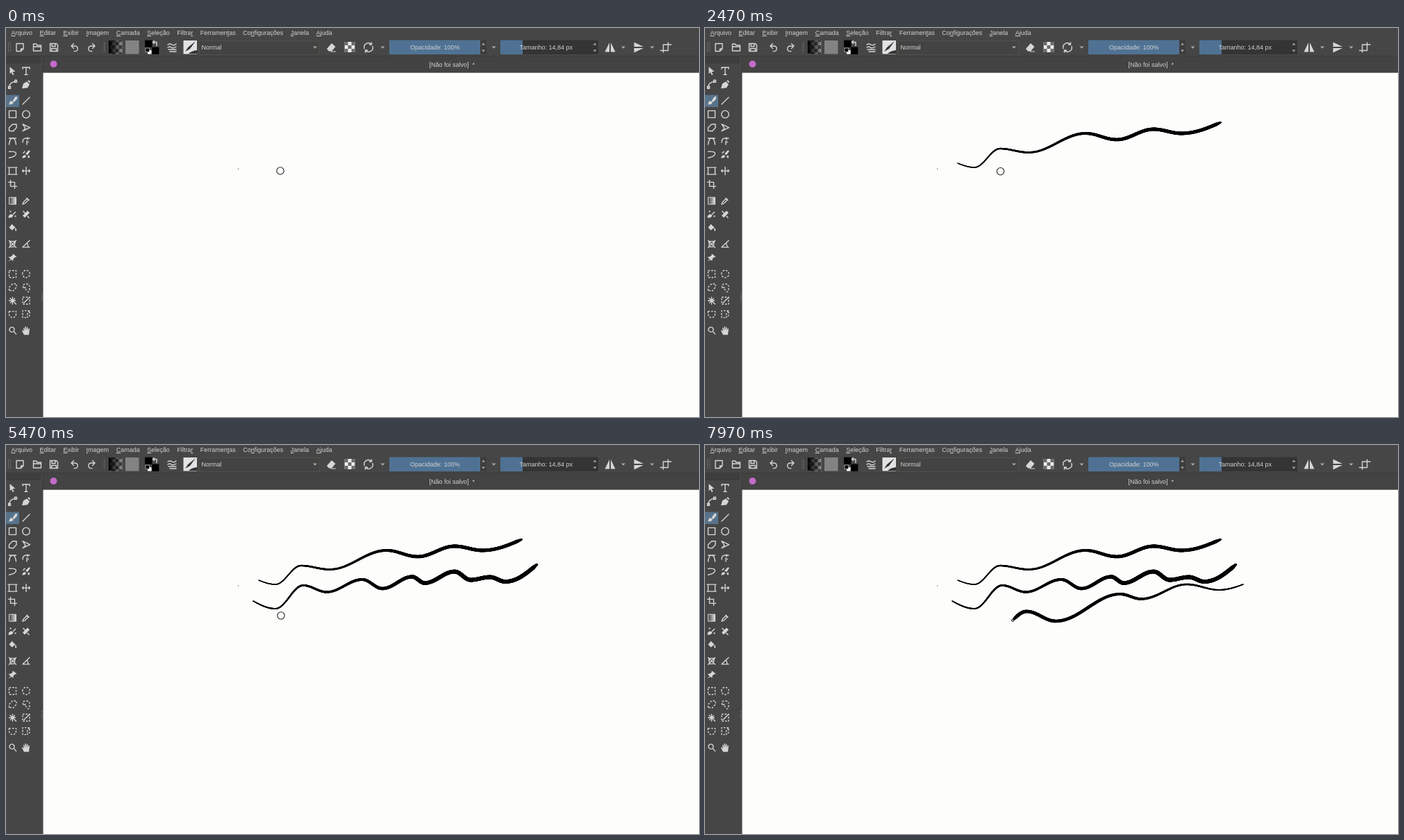
These frames come from a looping animation (998x561 px, 8000 ms). An HTML page with a canvas:

```html
<!DOCTYPE html>
<html lang="pt">
<head>
<meta charset="utf-8">
<title>Pintura</title>
<style>
  html, body { margin: 0; width: 100%; height: 100%; overflow: hidden; background: #464646; }
  svg, canvas { position: absolute; left: 0; top: 0; width: 998px; height: 561px; }
  text, nav { font: 9px/12px "Liberation Sans", Arial, sans-serif; fill: #d2d2d2; color: #d2d2d2; white-space: pre; }
  nav { position: absolute; left: 7.5px; top: 1px; display: flex; gap: 10.5px; }
  .line, .dash { fill: none; stroke: #d6d6d6; stroke-width: 1.4; stroke-linejoin: round; stroke-linecap: round; }
  .dash { stroke-dasharray: 2.6 1.9; stroke-linecap: butt; }
  .fill { fill: #d6d6d6; }
  .arrow { fill: #a8a8a8; }
</style>
</head>
<body>
<svg viewBox="0 0 998 561">
  <defs>
    <pattern id="check" width="10" height="10" patternUnits="userSpaceOnUse" x="487.5" y="20">
      <path d="M0 0h10v10H0z" fill="#eee"/><path d="M0 0h5v5H0zM5 5h5v5H5z" fill="#6c6c6c"/>
    </pattern>
    <pattern id="dots" width="3" height="3" patternUnits="userSpaceOnUse">
      <path d="M0 0h1.3v1.3H0z" fill="#858585"/>
    </pattern>
    <linearGradient id="fade"><stop stop-color="#000"/><stop offset="1" stop-color="#000" stop-opacity=".4"/></linearGradient>
    <linearGradient id="ramp"><stop stop-color="#444"/><stop offset="1" stop-color="#e0e0e0"/></linearGradient>
  </defs>

  <rect width="998" height="561" fill="#464646"/>
  <rect x="54" y="41" width="944" height="24" fill="#434343"/>
  <rect y="41" width="50" height="10" fill="#3e3e3e"/>
  <path d="M0 40.5h998M53.5 41v520" stroke="#3b3b3b"/>
  <rect x="53.5" y="64.6" width="945" height="497" fill="#fdfdfb"/>
  <path d="M2 21h5v13H2zM139 21h5v13h-5zM51 382h2v13h-2z" fill="url(#dots)"/>

  <rect x="278.5" y="18.5" width="173" height="20" fill="#434343" stroke="#505046"/>
  <rect x="712" y="17.5" width="141" height="20.5" fill="#343434"/>
  <path d="M552 17.5h131V38H552zM712 17.5h32V38h-32z" fill="#4f7294"/>
  <path d="M683 17.5h9V38h-9z" fill="#3d3d3d"/>
  <text x="281.5" y="31">Normal</text>
  <text x="582" y="31">Opacidade: 100%</text>
  <text x="739.5" y="31">Tamanho: 14,84 px</text>
  <text x="609.5" y="56">[Não foi salvo]  *</text>
  <circle cx="68.5" cy="52" r="5" fill="#c36bc8"/>

  <rect x="147.5" y="18" width="20" height="19.5" fill="url(#check)"/>
  <rect x="147.5" y="18" width="20" height="19.5" fill="url(#fade)"/>
  <rect x="172" y="18" width="19.500" height="19.5" fill="#838383"/>
  <path d="M210 27.500h10.500V38H210zM200 17.500h10.500V28H200z" stroke="#333" stroke-width=".6"/>
  <rect x="204" y="32" width="5.500" height="5.500" fill="#fff"/>
  <rect x="201" y="29" width="5.500" height="5.500" stroke="#ccc" stroke-width=".7"/>
  <rect x="255.500" y="18" width="19.500" height="19.500" fill="#e2e2e2"/>
  <path d="M258 34l4-6 11-9-8 11zM263 37q4-4 12-5v5z" fill="#333"/>
  <rect x="487.500" y="20" width="15" height="15" fill="url(#check)"/>
  <g id="icons"></g>
</svg>
<nav>
  <span><u>A</u>rquivo</span><span><u>E</u>ditar</span><span><u>E</u>xibir</span><span><u>I</u>magem</span>
  <span><u>C</u>amada</span><span><u>S</u>eleção</span><span>Filtra<u>r</u></span><span>Ferramen<u>t</u>as</span>
  <span>Co<u>n</u>figurações</span><span><u>J</u>anela</span><span><u>A</u>juda</span>
</nav>
<canvas id="paper" width="998" height="561"></canvas>
<script>
// Icons, each drawn around its own centre
const shape = kind => d => `<path class="${kind}" d="${d}"/>`;
const [line, dash, fill, arrow] = ['line', 'dash', 'fill', 'arrow'].map(shape);
const place = (x, y, icon) => `<g transform="translate(${x} ${y})">${icon}</g>`;

const SQUARE = 'M-5-5H5V5H-5z';
const CIRCLE = 'M-5.3 0a5.3 5.3 0 1 1 10.6 0a5.3 5.3 0 1 1-10.6 0';
const POLYGON = 'M-5 4.500V0l5-5h5.500v5L1 5z';
const BEZIER = 'M-5 5Q-4-4 0-4T5 5M-5-4H5';
const DOWN = arrow('M-3-1.500h6L0 1.800z');
const SPIN = arrow('M-2.500-3.500l2.500-3 2.500 3zM-2.500 3.500l2.500 3 2.500-3z');

const toolGroups = [
  [fill('M-4-6L4 1H0l2 4-1.800 1L-1.500 2-4 4z'),
   line('M-5-3v-2.300H5V-3M0-5V5.300M-2 5.300h4'),
   line('M-5 5Q-5-3 4-4M3-6h3v3H3zM-6 3h3v3h-3z'),
   fill('M-6 6l2-7 5-3 4 4-3 5zM2-5l2-1 2 2-1 2z')],
  ['<rect x="-9.500" y="-8.600" width="19" height="17.500" fill="#57738c"/>' +
     fill('M-6 5q2-1 2-4 3-2 5 1 0 4-7 3zM0 0l4-6h3l-1 4-4 4z'),
   line('M-5 5L5-5'), line(SQUARE), line(CIRCLE), line(POLYGON),
   line('M-5-5L5.500 0-5 5l4-4z'), line(BEZIER),
   line('M-5 2q0-6 5-6h5M2-5v3M1 0v5M3 1v1'),
   line('M-5-4q10-1 10 3t-10 6'),
   fill('M-6 5q2-5 5-4l1 2q-2 3-6 2zM-1-1l5-5 2 1-4 6zM-5-2l3-3 1 1-3 3zM2 2h3v3H3z')],
  [line(SQUARE + 'M-6.500-5h1M5-5h1.500M-6.500 5h1M5 5h1.500'),
   line('M-5.500 0h11M0-5.500v11M-4-1.500L-5.500 0-4 1.500M4-1.500L5.500 0 4 1.500'),
   line('M-3-6v9h9M-6-3h9v9')],
  [`<path d="${SQUARE}" fill="url(#ramp)" stroke="#d6d6d6"/>`,
   line('M-5 5l1-3 5-5 2 2-5 5zM1-4l3 3'),
   fill('M-6 5q0-5 5-5l2 2q-2 4-7 3zM0 0l4-4 1 1-4 4zM-4-5h2v2h-2zM3 2h2v2H3z'),
   fill('M-5 2L2-5l3 3-7 7zM-5-4l1-1 3 3-1 1zM1 3l1-1 3 3-1 1z'),
   fill('M-5 0l4-5 5 5-5 4zM4 0q3 4 1 5t-1-5z')],
  [line('M-4-4h8L2 4h-5zM-5-5L5 5M5-5L-5 5'),
   line('M5-5L-5 4.500H5M1-1q2 2 2 5'),
   fill('M0-5h1l5 4-3 1-2 2v3l-3-2-4 3 3-4-3-3h3l3-2z')],
  [dash(SQUARE), dash(CIRCLE), dash(POLYGON),
   dash('M-4 1Q-6-5 0-5T5 2 1 5-1 0z'),
   line('M-5 0H4M0-5V5M-3.500-3.500L5 5M3-3L-3 3'),
   dash(SQUARE) + line('M-3 3L4-4'),
   dash('M-5-4H5Q6 5 0 5T-5-4z'),
   dash('M5-5H-5V5H0M5-5Q0 0 2 5l3-3z')],
  [line('M-4.500-1.500a3.500 3.500 0 1 1 7 0a3.500 3.500 0 1 1-7 0M2 1.500l3 3.500'),
   fill('M-3 6l-3-6 1-1 2 2-1-5h1.500l1 4V-6H0v6l1-5h1.500v5l1-3H5L4 6z')]
];

// Two columns, with a gap after each group
function toolbox() {
  const rowHeight = 19.3, groupGap = 4.5;
  let y = 62, html = '';
  for (const group of toolGroups) {
    group.forEach((icon, i) => html += place(i % 2 ? 29 : 9.5, y + (i >> 1) * rowHeight, icon));
    y += Math.ceil(group.length / 2) * rowHeight + groupGap;
  }
  return html;
}

const undo = line('M-1.500-5.500l-3.500 3.500 3.500 3.500M-5-2h5.500a3.800 3.800 0 0 1 0 7.600H-1');
const mirror = fill('M-1-7v13.500h-6.500zM1-7v13.500h6.500z');
const toolbar = {
  20: line('M-5-5.500H5V2L1.500 5.500H-5zM5 2H1.500v3.500'),
  45: line('M-5.500 5v-10h4l1.500 2h5.500v8zM-5.500-1H5.500'),
  69: line('M-5.500-5.500h9l2 2v9h-11zM-3-5.500v4h5v-4M-3.500 5.500v-4h7v4'),
  99: undo,
  123: `<g transform="scale(-1 1)">${undo}</g>`,
  215: line('M-3-7.500h5v5M-1.500-9.500l-2 2 2 2'),
  239: line('M-6-4q3-2 6 0t6-1M-6 0q3-2 5 0t7-1M-5 3H6M-3 6H6'),
  445: DOWN,
  468: fill('M-6 2L1-6 6.500-1 1 5.500H-3zM0 5.500h7v1H0z'),
  522: line('M-6 1.500A6 6 0 0 1 4-4.500M6-1.500A6 6 0 0 1-4 4.500M4.500-7v3H1.500M-4.500 7v-3h3'),
  542.5: DOWN, 687.5: SPIN, 702.5: DOWN, 848: SPIN,
  870: mirror, 889: DOWN,
  911: `<g transform="rotate(90)">${mirror}</g>`, 930.5: DOWN,
  950: line('M-7.500 4.500H3.500V-7M-3.500 7V-4H8')
};

document.getElementById('icons').innerHTML = toolbox() +
  Object.entries(toolbar).map(([x, icon]) => place(x, 28, icon)).join('');

// A stroke runs through its crests and troughs; the pen first hovers past `via` (time, x, y).
const strokes = [
  { via: [[0, 395, 206]], from: 959, to: 2091, thin: 1.3, full: 4.9,
    turns: [[364,195], [388,201], [425,174], [466,179.5], [548,152], [593,161], [646,146], [686,152], [743,136]] },
  { via: [[2530, 411, 210], [3130, 350, 230]], from: 3300, to: 4805, thin: 1.6, full: 5.6,
    turns: [[356,225], [388,236], [428,202.5], [462,212], [513,194], [542,207], [585,190], [603,199],
            [646,182.5], [669,194.5], [697,190.5], [719,197], [765,172]] },
  { via: [[5470, 396, 246], [5850, 374, 240], [6550, 803, 205]], from: 6943, to: 7970, thin: 1.6, full: 4.6,
    turns: [[775,201], [740,209], [694,201], [628,222], [598,215], [505,254], [463,240], [443,253]] }
];

const mix = (a, b, k) => a + (b - a) * k;
const ease = k => (1 - Math.cos(Math.PI * k)) / 2;

// Cosine waves between turns; the two ends are quarter waves.
function trace(stroke) {
  const { turns, thin, full } = stroke, last = turns.length - 2;
  const path = [];
  let length = 0;
  for (let i = 0; i <= last; i++) {
    const [[x0, y0], [x1, y1]] = turns.slice(i, i + 2);
    for (let k = 0; k < 1; k += 0.01) {
      const bend = i === 0 ? Math.sin(k * Math.PI / 2) : i === last ? 1 - Math.cos(k * Math.PI / 2) : ease(k);
      const x = mix(x0, x1, k), y = mix(y0, y1, bend), prev = path.at(-1);
      if (prev) length += Math.hypot(x - prev.x, y - prev.y);
      path.push({ x, y, s: length });
    }
  }
  for (const p of path) {
    const taper = Math.min(1, 0.6 + (length - p.s) / 18);
    p.r = mix(thin, full, Math.min(1, p.s / length / 0.65)) * taper / 2;
  }
  Object.assign(stroke, { path, length });
}
strokes.forEach(trace);

const hover = strokes.flatMap(({ via, from, to, path }) =>
  [...via, [from, path[0].x, path[0].y], [to, path.at(-1).x, path.at(-1).y]]);

const ctx = document.getElementById('paper').getContext('2d');

function disc(x, y, r) {
  ctx.beginPath();
  ctx.arc(x, y, r, 0, 2 * Math.PI);
}

function ring(x, y, r) {
  disc(x, y, r);
  ctx.strokeStyle = '#222';
  ctx.lineWidth = 1.1;
  ctx.stroke();
}

function drawStroke({ path, length, from, to }, t) {
  const reach = length * (t - from) / (to - from);
  const drawn = path.filter(p => p.s <= reach);
  ctx.fillStyle = '#000';
  for (const p of drawn) {
    disc(p.x, p.y, p.r);
    ctx.fill();
  }
  return drawn.at(-1);
}

function drawHover(t) {
  const next = hover.findIndex(key => key[0] > t);
  const [t0, x0, y0] = hover[next - 1], [t1, x1, y1] = hover[next];
  const k = ease((t - t0) / (t1 - t0));
  ring(mix(x0, x1, k), mix(y0, y1, k), 5.2);
}

function draw(t) {
  ctx.clearRect(0, 0, 998, 561);
  ctx.fillStyle = '#555';
  ctx.fillRect(334, 202.5, 1.2, 1.2);
  const begun = strokes.filter(s => t >= s.from);
  const tip = begun.map(s => drawStroke(s, t)).at(-1);
  const pressing = begun.length === strokes.length || (tip && t < begun.at(-1).to);
  if (!pressing) return drawHover(t);
  const r = Math.max(1.6, tip.r);
  ctx.fillStyle = '#eee';
  disc(tip.x, tip.y, r);
  ctx.fill();
  ring(tip.x, tip.y, r);
}

const start = performance.now();
function tick() {
  draw((performance.now() - start) % 8000);
  requestAnimationFrame(tick);
}
tick();
</script>
</body>
</html>
```
